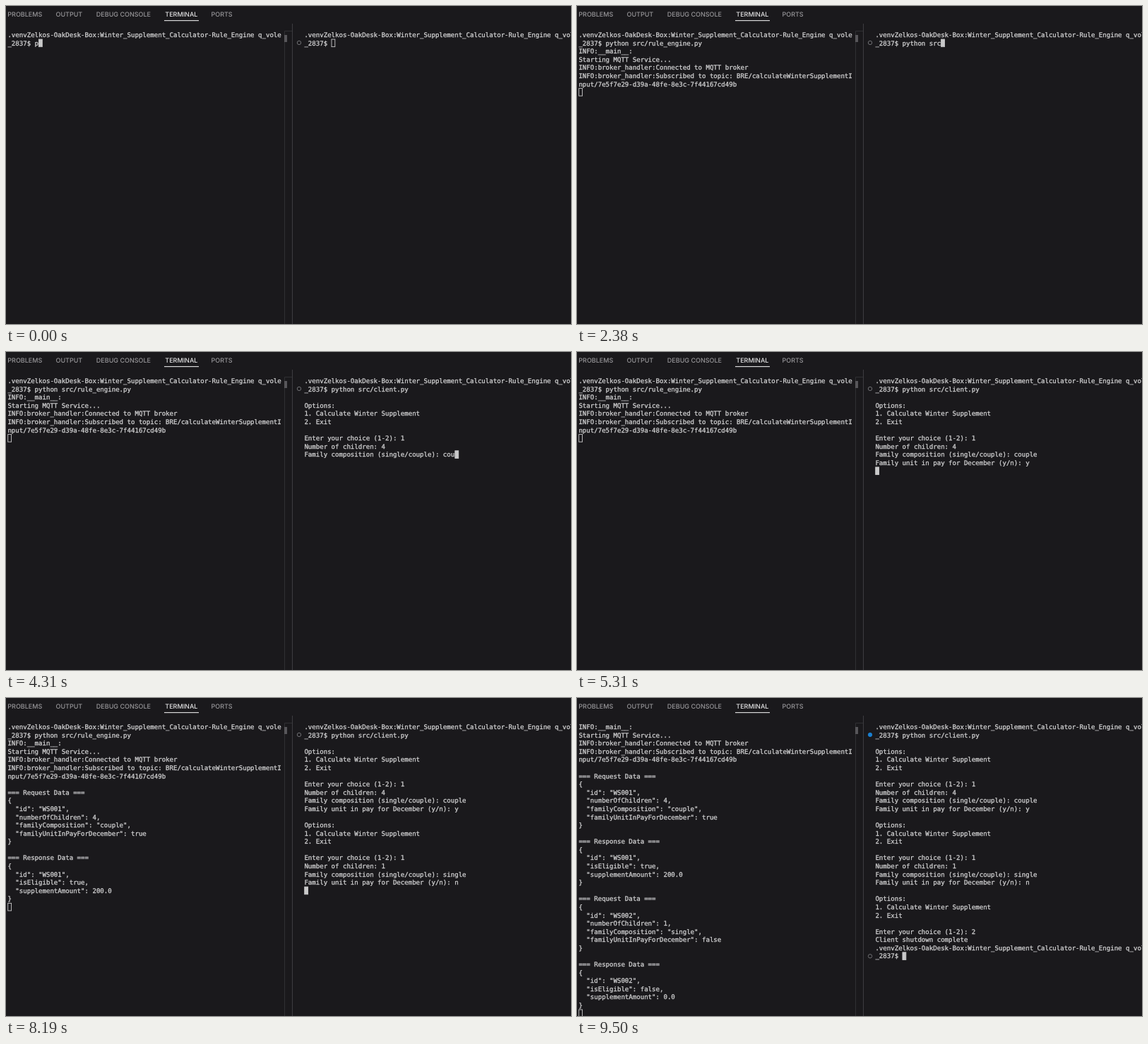
Recreate the animation shown at these times as an HTML page. Size 800 by 450 pixels, loop 10000 ms.

```html
<!DOCTYPE html>
<html lang="en">
<head>
<meta charset="utf-8">
<title>Rule engine terminal</title>
<style>
  html, body { margin: 0; width: 100%; height: 100%; overflow: hidden; background: #1a191c; }
  svg { display: block; width: 800px; height: 450px; }
  text { text-rendering: geometricPrecision; white-space: pre; }
  .tabs { font: 500 9px Inter, sans-serif; fill: #98979a; }
  .tabs .active { fill: #e4e4e5; }
  .pane { font: 9.078px "DejaVu Sans Mono", monospace; fill: #d0d0d1; }
  .pane text { stroke: #d0d0d1; stroke-width: .3px; }
  .caret { fill: #c9c9ca; stroke: #c9c9ca; stroke-width: .9px; }
  .caret.idle { fill: none; }
  .ring { fill: none; stroke: #77767a; stroke-width: .9px; }
  .done { fill: #1a7fd0; stroke: #1a7fd0; }
</style>
</head>
<body>
<svg viewBox="0 0 800 450">
  <rect width="800" height="450" fill="#1a191c"/>
  <g class="tabs">
    <text x="2.3" y="15.2">PROBLEMS</text>
    <text x="70.5" y="15.2">OUTPUT</text>
    <text x="127.8" y="15.2">DEBUG CONSOLE</text>
    <text x="225.3" y="15.2" class="active">TERMINAL</text>
    <text x="290.5" y="15.2">PORTS</text>
  </g>
  <rect x="224" y="20" width="49" height="1.2" fill="#d8d8d9"/>
  <path d="M394.5 450V35.5H405" fill="none" stroke="#303033"/>
  <path d="M405.5 25V450" stroke="#3d3c40"/>
  <rect x="394" y="41" width="4" height="10" fill="#57565a"/>
  <circle id="firstRing" class="ring" cx="415" cy="52" r="2.7"/>
  <circle id="lastRing" class="ring" cx="415" cy="365.3" r="2.7"/>
  <g id="left" class="pane"></g>
  <g id="right" class="pane"></g>
  <path id="pointer" d="M0 0V10.6L2.4 8.4L4.1 12.2L5.8 11.4L4.1 7.8H7.5Z"
        fill="#1a191c" stroke="#e6e6e6" stroke-width=".9" stroke-linejoin="round"/>
</svg>
<script>
const LOOP = 10000, TICK = 62.5;
const COL = 5.465, ROW = 11.585, TOP = 35, ROWS = 36;
const PROMPT = ".venvZelkos-OakDesk-Box:Winter_Supplement_Calculator-Rule_Engine q_vole\n_2837$ ";
const MENU = "\nOptions:\n1. Calculate Winter Supplement\n2. Exit\n\nEnter your choice (1-2): ";
const CHILDREN = "\nNumber of children: ";
const FAMILY = "\nFamily composition (single/couple): ";
const IN_PAY = "\nFamily unit in pay for December (y/n): ";

const exchange = (id, children, family, inPay, eligible, amount) => `
=== Request Data ===
{
  "id": "${id}",
  "numberOfChildren": ${children},
  "familyComposition": "${family}",
  "familyUnitInPayForDecember": ${inPay}
}

=== Response Data ===
{
  "id": "${id}",
  "isEligible": ${eligible},
  "supplementAmount": ${amount}
}
`;

// Spreads the pieces of typed text over the given moments.
const typed = (pieces, ...times) => times.map((at, i) => [at, pieces[i]]);

const output = {
  left: [
    [0, PROMPT + "p"],
    ...typed("ython src", 60, 125, 190, 250, 310, 380, 440, 560, 690),
    [880, "/"], [1060, "rule_engine.py"], [1130, "\n"],
    [1250, "INFO:__main__:\nStarting MQTT Service...\n"],
    [1380, "INFO:broker_handler:Connected to MQTT broker\n"],
    [2060, "INFO:broker_handler:Subscribed to topic: BRE/calculateWinterSupplementI\n" +
           "nput/7e5f7e29-d39a-48fe-8e3c-7f44167cd49b\n"],
    [5500, exchange("WS001", 4, "couple", true, true, "200.0")],
    [8440, exchange("WS002", 1, "single", false, false, "0.0")]
  ],
  right: [
    [0, PROMPT],
    ...typed("python src", 1690, 1750, 1810, 1880, 1940, 2000, 2060, 2190, 2250, 2380),
    ...typed(["/", "c", "l", "ient.py", "\n", MENU], 2560, 2630, 2690, 2810, 2880, 3000),
    [3380, "1"], [3630, CHILDREN], [3880, "4"], [4000, FAMILY],
    ...typed(["co", "u", "p", "l", "e"], 4250, 4310, 4380, 4440, 4500),
    [4750, IN_PAY], [5190, "y"], [5310, "\n"], [5500, MENU],
    [6130, "1"], [6440, CHILDREN], [7000, "1"], [7060, FAMILY],
    ...typed(["s", "in", "g", "l", "e"], 7310, 7380, 7440, 7560, 7630),
    [7810, IN_PAY], [8060, "n"], [8190, "\n"], [8440, MENU],
    [8630, "2"], [8750, "\n"], [9000, "Client shutdown complete\n"], [9060, PROMPT]
  ]
};
const FOCUS_RIGHT = 1500, CLIENT_DONE = 9060;

// Each visit: start, end, and optionally the moving span with its two ends.
const REST = [667, 149];
const visits = [
  { from: 690, to: 880, a: [81, 75] },
  { from: 1190, to: 1750, a: [81, 75], b: [562, 40], move: 300 },
  { from: 2880, to: 3380, a: [562, 47], b: REST, move: 250 },
  { from: 3630, to: 3880, a: REST },
  { from: 4750, to: 4880, a: REST },
  { from: 5940, to: 6130, a: REST },
  { from: 6440, to: 7310, a: REST }
];

const byId = id => document.getElementById(id);
function add(parent, tag, attrs) {
  const node = document.createElementNS("http://www.w3.org/2000/svg", tag);
  for (const key in attrs) node.setAttribute(key, attrs[key]);
  return parent.appendChild(node);
}

function makePane(id, x) {
  const group = byId(id);
  const lines = Array.from({ length: ROWS }, (_, i) =>
    add(group, "text", { x, y: TOP + i * ROW + 9.1 }));
  const caret = add(group, "rect", { width: COL - .6, height: ROW - 1 });
  let shown;
  return (t, focused) => {
    caret.setAttribute("class", focused ? "caret" : "caret idle");
    const text = output[id].filter(([at]) => at <= t).map(([, piece]) => piece).join("");
    if (text === shown) return;
    shown = text;
    const rows = text.split("\n").slice(-ROWS);
    lines.forEach((line, i) => line.textContent = rows[i] || "");
    caret.setAttribute("x", x + rows[rows.length - 1].length * COL + .3);
    caret.setAttribute("y", TOP + (rows.length - 1) * ROW + .5);
  };
}
const drawLeft = makePane("left", 2.4);
const drawRight = makePane("right", 422.4);

function drawPointer(t) {
  const pointer = byId("pointer");
  const visit = visits.find(v => t >= v.from && t < v.to);
  pointer.style.display = visit ? "" : "none";
  if (!visit) return;
  const { from, a, b = a, move = 1 } = visit;
  const stepped = Math.ceil((t - from) / TICK) * TICK;
  const p = Math.min(1, stepped / move);
  const ease = p * p * (3 - 2 * p);
  const [x, y] = a.map((start, i) => start + (b[i] - start) * ease);
  pointer.setAttribute("transform", `translate(${x} ${y})`);
}

function draw(now) {
  const t = now % LOOP;
  drawLeft(t, t < FOCUS_RIGHT);
  drawRight(t, t >= FOCUS_RIGHT);
  drawPointer(t);
  const done = t >= CLIENT_DONE;
  byId("firstRing").setAttribute("class", done ? "ring done" : "ring");
  byId("lastRing").style.display = done ? "" : "none";
  requestAnimationFrame(draw);
}
draw(0);
</script>
</body>
</html>
```
